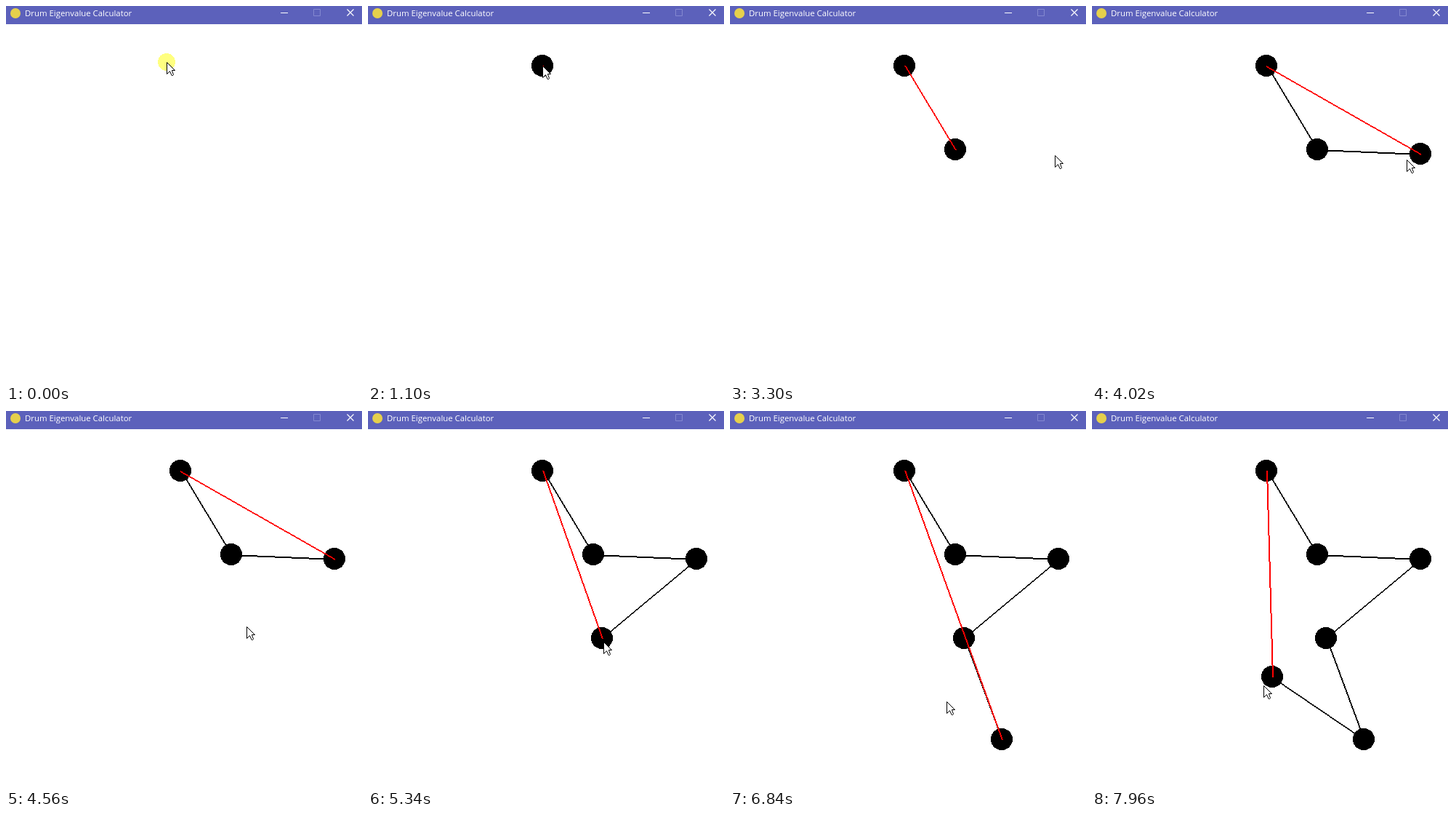
An HTML page for the animation above (8 s loop, 490x518 px).

```html
<!DOCTYPE html>
<html lang="en">
<head>
<meta charset="utf-8">
<title>Drum Eigenvalue Calculator</title>
<style>
  html, body { margin: 0; width: 100%; height: 100%; overflow: hidden; background: #fff; }
  svg { display: block; width: 490px; height: 518px; }
  text { font: 11.4px "Open Sans", "Noto Sans", sans-serif; fill: #fff; }
  .crisp { shape-rendering: crispEdges; }
</style>
</head>
<body>
<svg viewBox="0 0 490 518">
  <rect width="490" height="518" fill="#fff"/>
  <rect width="490" height="25" fill="#5c61bb"/>
  <circle cx="13" cy="10" r="7" fill="#e6d04c"/>
  <text x="26" y="14">Drum Eigenvalue Calculator</text>
  <g fill="none" stroke="#fff">
    <path d="M378 9.5h10"/>
    <path d="M423.5 4.5h9v9h-9z" stroke="#8488d0"/>
    <path d="M469.5 4.5l9 9m0-9l-9 9" stroke-width="1.2"/>
  </g>
  <g class="crisp">
    <circle id="halo" cx="221" cy="77" r="12" fill="#ffff80"/>
    <path id="edges"/>
    <g id="dots"></g>
    <path id="closing" fill="#f00"/>
  </g>
  <path id="cursor" fill="#fff" stroke="#000"
    d="M.5 .5V16.5L4.5 12.7 7.2 18.5H8.6L9.5 17.4 7.4 11.5H11.5Z"/>
</svg>
<script>
const LOOP = 8000;
const HALO_END = 160;
const START = [221, 77];

// Each click adds a corner: time, x, y
const corners = [
  [1100, 240, 82], [2360, 310, 197], [3700, 452, 203],
  [4940, 322, 312], [6300, 374, 451], [7560, 248, 365]
].map(([at, x, y]) => ({ at, x, y }));

// Cursor moves in discrete steps; bow bends the path sideways
const moves = [
  { at: 320, n: 2, to: [233, 82] },
  { at: 720, n: 2, gap: 60, to: [240, 82] },
  { at: 1500, n: 6, to: [309, 192] },
  { at: 2200, n: 2, to: [310, 197] },
  { at: 2740, n: 8, to: [447, 205], bow: [0, 4] },
  { at: 3460, n: 3, to: [452, 203] },
  { at: 4000, n: 11, to: [323, 309], bow: [-11, -11], lead: 0.65 },
  { at: 4860, n: 1, to: [322, 312] },
  { at: 5340, n: 11, to: [372, 446], bow: [-1, 2] },
  { at: 6220, n: 1, to: [374, 451] },
  { at: 6680, n: 7, to: [256, 362], bow: [-3, 3], lead: 0.64 },
  { at: 7320, n: 3, to: [248, 365] },
  { at: 7960, n: 1, to: [236, 377] }
];

const el = id => document.getElementById(id);
const smooth = p => p * p * (3 - 2 * p);

function cursorAt(t) {
  let pos = START;
  for (const { at, n, to, gap = 80, bow = [0, 0], lead = 0.9 } of moves) {
    if (t < at) break;
    const step = Math.min(n, Math.floor((t - at) / gap) + 1);
    const e = smooth((step / n) ** lead);
    pos = pos.map((from, i) =>
      Math.round(from + (to[i] - from) * e + bow[i] * 4 * e * (1 - e)));
  }
  return pos;
}

// Two-pixel line, thickened across its minor axis
function band(a, b) {
  const steep = Math.abs(b.y - a.y) >= Math.abs(b.x - a.x);
  if (steep) {
    const [p, q] = a.y <= b.y ? [a, b] : [b, a];
    return `M${p.x} ${p.y}h2L${q.x + 2} ${q.y + 1}h-2Z`;
  }
  const [p, q] = a.x <= b.x ? [a, b] : [b, a];
  return `M${p.x} ${p.y}v2L${q.x + 1} ${q.y + 2}v-2Z`;
}

for (const { x, y } of corners) {
  const dot = document.createElementNS("http://www.w3.org/2000/svg", "circle");
  dot.setAttribute("cx", x);
  dot.setAttribute("cy", y);
  dot.setAttribute("r", 15);
  el("dots").append(dot);
}

function draw(t) {
  const placed = corners.filter(c => c.at <= t);
  const dots = el("dots").children;
  corners.forEach((c, i) => dots[i].setAttribute("visibility", c.at <= t ? "visible" : "hidden"));
  el("halo").setAttribute("visibility", t < HALO_END ? "visible" : "hidden");
  el("edges").setAttribute("d", placed.slice(1).map((c, i) => band(placed[i], c)).join(""));
  el("closing").setAttribute("d", placed.length ? band(placed[0], placed.at(-1)) : "");
  el("cursor").setAttribute("transform", `translate(${cursorAt(t)})`);
}

const begin = performance.now();
function frame() {
  draw((performance.now() - begin) % LOOP);
  requestAnimationFrame(frame);
}
frame();
</script>
</body>
</html>
```
